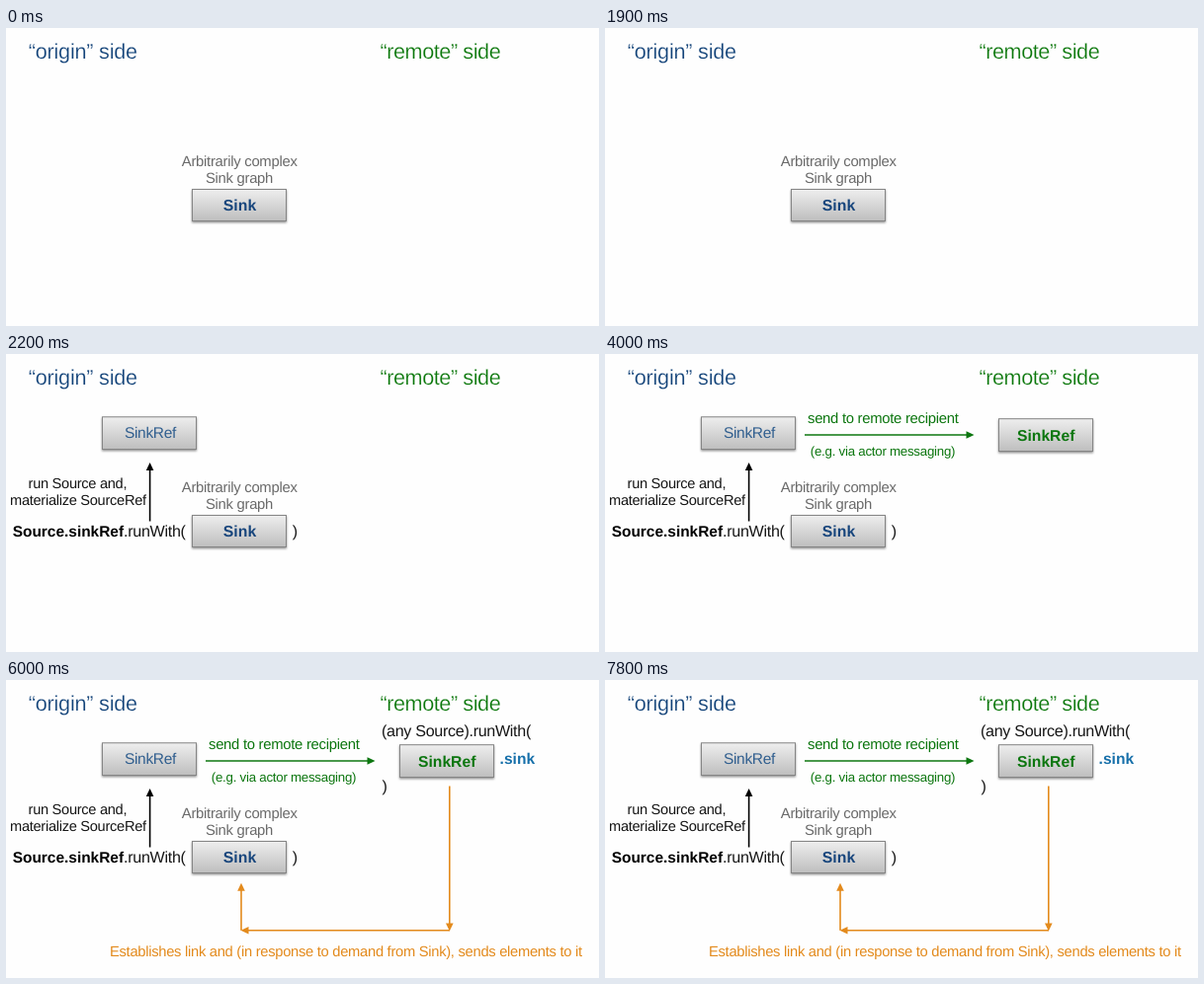
Write an HTML page that moves like this. It is 600 px wide and 302 px high and loops after 8 s.

```html
<!DOCTYPE html>
<html lang="en">
<head>
<meta charset="utf-8">
<title>SinkRef</title>
<style>
  html, body { margin: 0; width: 100%; height: 100%; overflow: hidden; background: #fefefe; }
  svg { display: block; width: 600px; height: 302px; }
  text { font-family: "Liberation Sans", Arial, sans-serif; text-rendering: geometricPrecision; }
  .mid { text-anchor: middle; }
  .bold { font-weight: bold; }
  .tight { letter-spacing: -.019em; }
  .title { font-size: 21.6px; stroke: #fefefe; stroke-width: .25px; }
  .step { opacity: 0; }
  .line { fill: none; stroke-width: 1.6; }
  .box { fill: url(#metal); stroke: #858585; stroke-width: 1; filter: url(#shadow); }
</style>
</head>
<body>
<svg viewBox="0 0 600 302">
  <defs>
    <linearGradient id="metal" x1="0" y1="0" x2="0" y2="1">
      <stop offset="0" stop-color="#eeeeee"/>
      <stop offset="1" stop-color="#bebebe"/>
    </linearGradient>
    <filter id="shadow" x="-10%" y="-20%" width="120%" height="150%">
      <feDropShadow dx="0" dy="1.3" stdDeviation="1.1" flood-color="#000" flood-opacity=".45"/>
    </filter>
    <path id="head" d="M0 0 L-8 -3.8 L-8 3.8 Z"/>
  </defs>

  <text class="title" x="22.8" y="31" letter-spacing="-.01em" fill="#0f4077">“origin” side</text>
  <text class="title tight" x="378.4" y="31" fill="#0a770a">“remote” side</text>
  <g class="mid tight" font-size="14.85" fill="#6a6a6a">
    <text x="236.2" y="139.5">Arbitrarily complex</text>
    <text x="236" y="156.7">Sink graph</text>
  </g>
  <rect class="box" x="188.5" y="163.5" width="95" height="32"/>
  <text class="mid bold" x="236.5" y="185.3" font-size="15.8" fill="#17457c">Sink</text>

  <g class="step" data-at="2000">
    <rect class="box" x="97.5" y="63.8" width="95" height="32.7"/>
    <text class="mid tight" x="146" y="85.3" font-size="15.5" fill="#315f8f">SinkRef</text>
    <g class="mid tight" font-size="14.6" fill="#161616">
      <text x="72.4" y="136.3">run Source and,</text>
      <text x="72.9" y="153.3">materialize SourceRef</text>
    </g>
    <path class="line" stroke="#000" d="M145.6 169.5 V115"/>
    <use href="#head" transform="translate(145.6 110) rotate(-90)"/>
    <text x="6.7" y="185.3" font-size="15.45"><tspan class="bold">Source.sinkRef</tspan><tspan class="tight" font-size="16.1" fill="#161616">.runWith(</tspan></text>
    <text x="289.7" y="185.3" font-size="16.1" fill="#161616">)</text>
  </g>

  <g class="step" data-at="4000" fill="#0c760f">
    <text class="tight" x="205" y="70" font-size="14.85">send to remote recipient</text>
    <text class="tight" x="207.8" y="103" font-size="13.3">(e.g. via actor messaging)</text>
    <path class="line" stroke="#0c760f" d="M202 82 H368"/>
    <use href="#head" transform="translate(373.5 82)"/>
    <rect class="box" x="398.5" y="65.7" width="95" height="32.8"/>
    <text class="mid bold" x="446.2" y="87.5" font-size="15.7">SinkRef</text>
  </g>

  <g class="step" data-at="6000">
    <g class="tight" font-size="16.1" fill="#161616">
      <text x="380" y="57">(any Source).runWith(</text>
      <text x="380.5" y="113">)</text>
    </g>
    <text class="bold" x="499.6" y="85.3" font-size="15.6" fill="#1770aa">.sink</text>
    <g fill="#e38a1c">
      <path class="line" stroke="#e38a1c" d="M448.8 107.5 V249 M449 253.7 H243 M238 253.7 V211"/>
      <use href="#head" transform="translate(448.8 254.5) rotate(90)"/>
      <use href="#head" transform="translate(237.5 253.7) rotate(180)"/>
      <use href="#head" transform="translate(238 205.8) rotate(-90)"/>
      <text class="tight" x="105" y="280" font-size="14.72">Establishes link and (in response to demand from Sink), sends elements to it</text>
    </g>
  </g>
</svg>
<script>
  const LOOP = 8000;
  for (const el of document.querySelectorAll('.step')) {
    el.animate([
      { opacity: 0, offset: 0, easing: 'step-end' },
      { opacity: 1, offset: el.dataset.at / LOOP },
      { opacity: 1, offset: 1 }
    ], { duration: LOOP, iterations: Infinity });
  }
</script>
</body>
</html>
```
